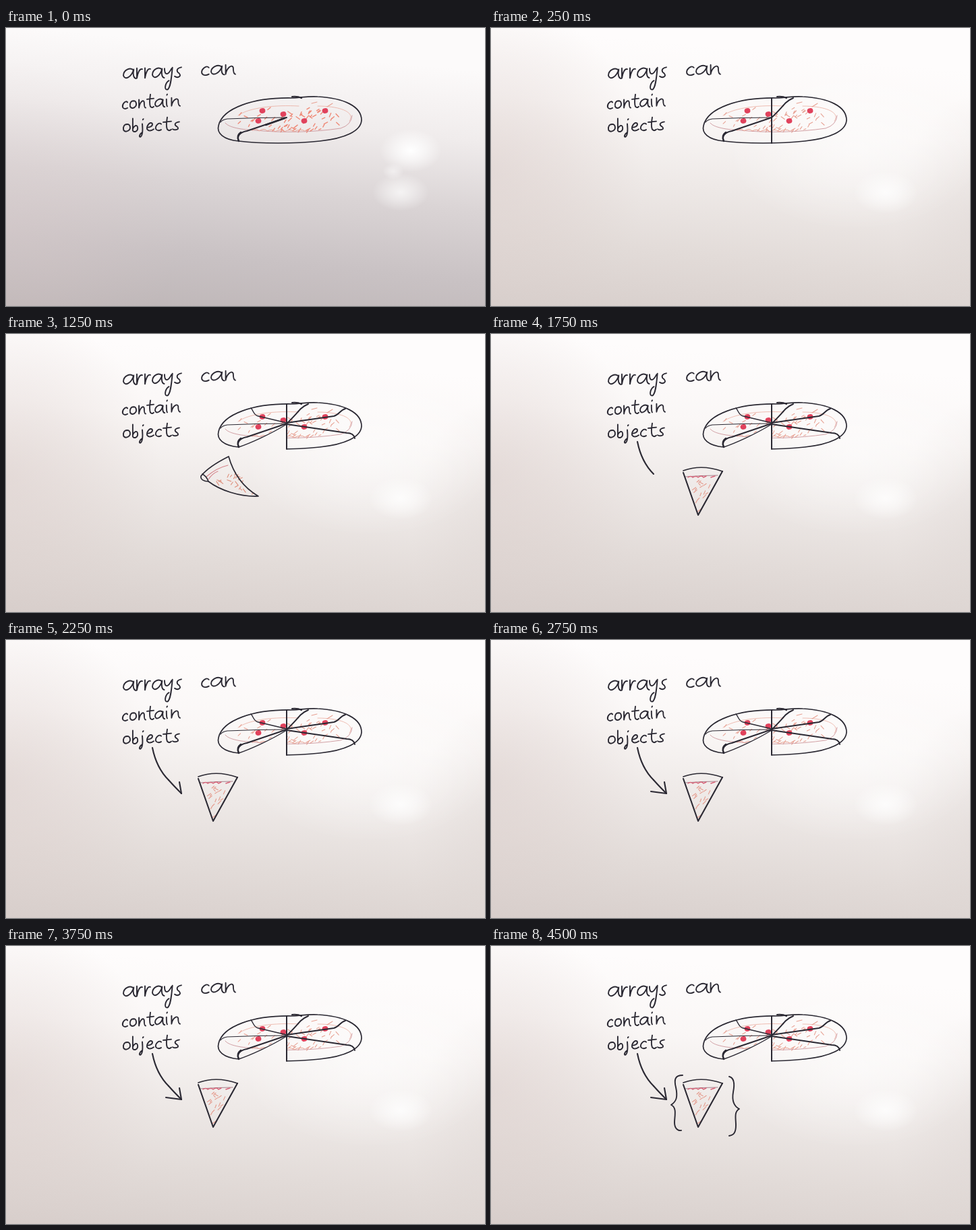
Recreate the animation shown at these times as an HTML page with a canvas. Size 710 by 413 pixels, loop 4750 ms.

```html
<!DOCTYPE html>
<html lang="en">
<head>
<meta charset="utf-8">
<title>Arrays can contain objects</title>
<style>
html, body { margin: 0; width: 100%; height: 100%; overflow: hidden; background: #f3eeec; }
canvas { display: block; width: 710px; height: 413px; }
</style>
</head>
<body>
<canvas id="board" width="710" height="413" role="img" aria-label="arrays can contain objects"></canvas>
<script>
const W = 710, H = 413, STEP = 250, LOOP = 4750;
const ctx = document.getElementById('board').getContext('2d');
const INK = '#2b2933', RED = '#e0425c', SAUCE = '#e8a294';

// Pen strokes per letter: x-height and width are both 10 units.
const glyphs = {
  a: 'M9 2C6-2 0 2 0 7C1 12 7 9 9 1C8 6 9 10 11 10',
  b: 'M1-6L1 9C3 12 10 10 9 5C8 1 3 3 1 7',
  c: 'M9 2C6-1 0 4 1 8C3 11 7 10 9 9',
  e: 'M1 6C5 6 9 4 8 1C5-2 0 4 1 8C3 11 7 10 10 8',
  i: 'M3 1C3 5 3 9 5 10M4-4L5-5',
  j: 'M5 1C6 8 6 15 2 17C-2 18 0 14 4 12M6-4L7-5',
  n: 'M1 0L1 10C2 3 7-1 8 3C8 6 8 10 10 10',
  o: 'M6 1C2 0 0 4 1 8C4 12 10 8 9 4C9 2 7 0 5 1',
  r: 'M1 0L1 10C2 5 5 0 9 1',
  s: 'M9 0C2 1 2 4 6 6C10 9 4 11 0 9',
  t: 'M5-6C4 0 4 7 5 9C7 11 9 10 10 9M0 0L10-1',
  y: 'M0 1C0 8 4 8 8 1M9 0C8 9 7 21 3 22C-1 22 1 15 5 13'
};

// Each word: letters, top of x-height, x-height, drift of the line, left edges.
const words = [
  ['arrays', 60, 15, -2, [174, 193, 205, 217, 235, 250, 263]],
  ['can', 56, 14, -2, [289, 304, 324, 342]],
  ['contain', 108, 12, -5, [172, 183, 196, 209, 221, 236, 244, 260]],
  ['objects', 142, 12, -3, [173, 187, 198, 208, 221, 233, 247, 260]]
];

const lettering = new Path2D();
for (const [word, top, size, drift, xs] of words) {
  [...word].forEach((ch, i) => {
    const y = top + drift * i / word.length;
    const wide = (xs[i + 1] - xs[i] - 2) / 10;
    lettering.addPath(new Path2D(glyphs[ch]), new DOMMatrix([wide, 0, 0, size / 10, xs[i], y]));
  });
}

function rng(seed) {
  return () => (seed = seed * 16807 % 2147483647) / 2147483647;
}

function line(d, width = 1.6, color = INK) {
  ctx.lineWidth = width;
  ctx.strokeStyle = color;
  ctx.stroke(d instanceof Path2D ? d : new Path2D(d));
}

function glow(x, y, rx, ry, alpha, color = '255,255,255') {
  ctx.save();
  ctx.translate(x, y);
  ctx.scale(rx, ry);
  const g = ctx.createRadialGradient(0, 0, 0, 0, 0, 1);
  g.addColorStop(0, `rgba(${color},${alpha})`);
  g.addColorStop(.45, `rgba(${color},${alpha * .6})`);
  g.addColorStop(1, `rgba(${color},0)`);
  ctx.fillStyle = g;
  ctx.fillRect(-1, -1, 2, 2);
  ctx.restore();
}

function backdrop(dim) {
  const stops = dim
    ? ['#fcfafa', '#f0ecec', '#dad4d5', '#c9c2c4', '#bdb5b6']
    : ['#fefcfc', '#faf7f6', '#eee9e7', '#e2dbd8', '#d7cecb'];
  const g = ctx.createLinearGradient(40, 0, 0, H);
  stops.forEach((c, i) => g.addColorStop(i / 4, c));
  ctx.fillStyle = g;
  ctx.fillRect(0, 0, W, H);
  if (dim) {
    glow(0, 290, 260, 240, .35, '220,205,205');
    glow(600, 182, 46, 32, 1);
    glow(585, 244, 42, 28, .7);
    glow(574, 213, 16, 12, .5);
  } else {
    glow(0, 210, 230, 250, .5, '218,204,201');
    glow(720, 290, 120, 190, .35, '216,207,204');
    glow(540, 180, 190, 120, .55);
    glow(585, 244, 48, 32, .8);
  }
}

// Short topping strokes, spread evenly along the first coordinate of an area.
function sprinkle(seed, count, place, color, width) {
  const rand = rng(seed), path = new Path2D();
  for (let i = 0; i < count; i++) {
    const [x, y] = place((i + rand()) / count, rand());
    const turn = rand() < .75 ? -1.2 + rand() * .8 : .3 + rand() * .7;
    const len = 1.6 + rand() * 2;
    const dx = Math.cos(turn) * len, dy = Math.sin(turn) * len;
    path.moveTo(x - dx, y - dy);
    path.lineTo(x + dx, y + dy);
  }
  line(path, width, color);
}

const onPizza = (u, v) => {
  const r = Math.sqrt(u), a = v * Math.PI * 2;
  return [421 + 84 * r * Math.cos(a), 136 + 18 * r * Math.sin(a)];
};

// Cuts in the order they are made: path and line weight.
const cuts = [
  ['M415 133C380 133 350 134 328 135Q321 136 318 140', 1.2],
  ['M416 133C395 140 375 147 357 153C346 155 342 161 345 168', 2],
  ['M416 104V171', 2],
  ['M416 133C424 126 433 115 437 111Q441 107 448 104', 2],
  ['M416 132L486 122C494 120 495 113 503 111', 1.9],
  ['M416 134L505 147C512 147 516 150 517 155', 1.9],
  ['M416 132L374 122C367 121 367 114 363 110', 1.4]
];
const cutsMade = [2, 4, 6];

function pizza(step) {
  const open = step >= 4, dim = step === 0;
  ctx.save();
  if (open) {
    const keep = new Path2D();
    keep.rect(300, 90, 240, 95);
    keep.addPath(new Path2D('M416 134C390 150 360 163 345 168L343 178H416Z'));
    ctx.clip(keep, 'evenodd');
  }
  sprinkle(71, 60, onPizza, dim ? '#ee8a78' : SAUCE, dim ? 1.4 : 1.1);
  line('M344 130C360 118 400 114 434 116M462 116C500 116 518 127 509 138', .7, SAUCE);
  line('M325 141C330 148 350 151 370 152C410 156 455 155 496 149Q512 144 513 130', .8, '#c78a90');
  line('M365 152q6-4 10 1q8-5 12 0q8-4 12 1q8-5 14 0q8-5 14 0q10-5 16-1', 1, SAUCE);
  line('M453 112L461 110M476 117L484 112', 1.1, SAUCE);
  ctx.fillStyle = RED;
  for (const [x, y] of [[380, 123], [411, 128], [374, 138], [442, 138], [473, 123]]) {
    ctx.beginPath();
    ctx.ellipse(x, y, 4.4, 3.8, -.2, 0, Math.PI * 2);
    ctx.fill();
  }
  line('M345 168C322 166 312 156 315 145C321 119 366 103 424 104C440 103 449 101 462 102C500 104 527 116 527 137C526 153 503 164 465 168C430 172 375 172 345 168', 1.7);
  ctx.restore();
  line('M424 102Q432 101 438 104', 2.2);
  cuts.slice(0, cutsMade[step] ?? cuts.length).forEach(([d, w]) => line(d, w));
  if (dim) line('M413 134L385 144', 2.4);
  if (open) line('M345 168C360 163 390 150 416 134', 1.4);
  line('M345 168Q341 160 348 155', 2.4);
}

function tiltedSlice(dx, dy) {
  ctx.save();
  ctx.translate(dx, dy);
  sprinkle(19, 20, (u, v) => {
    const k = Math.sqrt(u) * .88;
    return [366 - k * (35 + v * 28), 237 - k * (42 - v * 24)];
  }, '#df9482', 1.2);
  line('M297 212Q312 199 329 195M300 216Q306 207 314 204', 1.1, '#d4838a');
  line('M330 182C337 207 352 228 374 241C346 242 317 232 300 219C293 219 288 216 289 211C298 200 316 189 330 182', 1.7);
  line('M291 208Q297 211 300 219', 1.6);
  ctx.restore();
}

function uprightSlice(turn) {
  ctx.save();
  ctx.translate(312, 226);
  ctx.rotate(turn);
  ctx.translate(-312, -226);
  sprinkle(43, 17, (u, v) => {
    const k = Math.sqrt(u);
    return [309 + (v - .5) * 38 * k + 2 * k, 262 - 44 * k];
  }, '#e59a8c', 1.1);
  line('M288 212Q314 210 336 210', .9, '#9c7480');
  line('M292 213q4-3 7 0q5-3 8 0q5-4 8 0l4-2M326 213l6-2', 1.5, '#d8657a');
  line('M285 203Q312 193 343 204', 1.7);
  line('M285 206L307 269L343 204', 2.1);
  ctx.restore();
}

const arrow = [
  [7, 'M217 160Q223 190 241 208'],
  [8, 'M241 208Q249 217 260 228'],
  [9, 'M260 228L257 211'],
  [10, 'M260 228L237 225']
];
const braces = [
  [16, 'M284 192C273 192 271 198 274 210C277 224 275 231 267 236C276 240 272 253 272 262C272 270 276 275 282 274'],
  [17, 'M353 194C361 196 361 207 359 217C357 229 360 238 368 242C360 246 363 257 363 266C363 277 360 281 353 282']
];

function draw(step) {
  backdrop(step === 0);
  ctx.lineCap = ctx.lineJoin = 'round';
  line(lettering, 1.9);
  pizza(step);
  if (step === 4) tiltedSlice(25, -3);
  else if (step === 5) tiltedSlice(0, 0);
  else if (step === 6) uprightSlice(-.5);
  else if (step > 6) uprightSlice(0);
  for (const [from, d] of arrow) if (step >= from) line(d, 2.1);
  for (const [from, d] of braces) if (step >= from) line(d, 1.9);
}

let shown = -1;
function tick(now) {
  const step = Math.floor(now % LOOP / STEP);
  if (step !== shown) draw(shown = step);
  requestAnimationFrame(tick);
}
draw(0);
requestAnimationFrame(tick);
</script>
</body>
</html>
```
